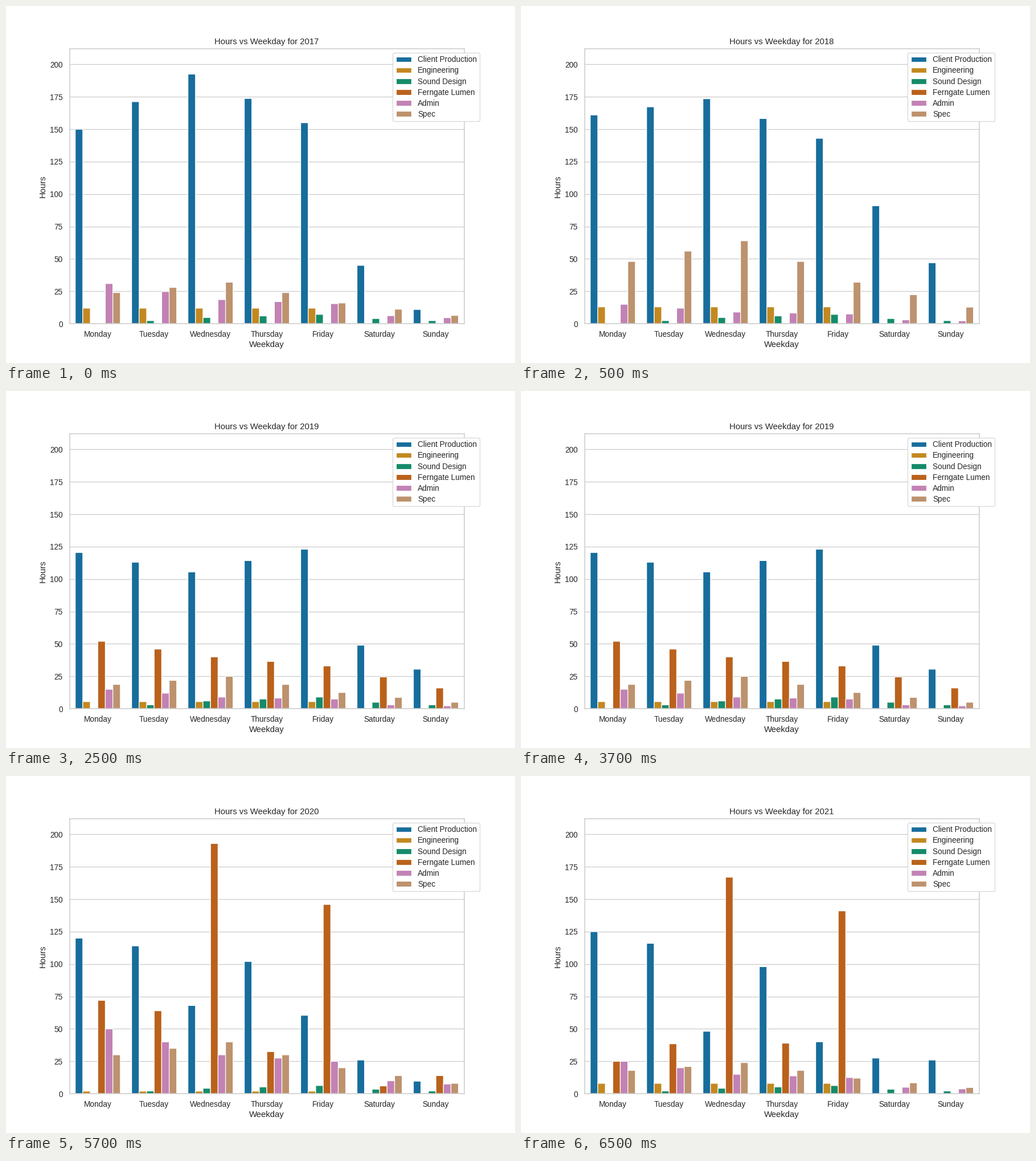
A matplotlib script that plays this animation: 894x626 px, repeating every 8000 ms.

```python
import colorsys

import matplotlib.pyplot as plt
import numpy as np
from matplotlib.animation import FuncAnimation
from matplotlib.colors import to_rgb

WIDTH, HEIGHT, DPI = 894, 626, 72   # at 72 dpi one point is one pixel
SCALE = 0.894 * 100 / DPI           # theme sizes assume a 10 x 7 inch page
INK, RULE = "0.15", "0.8"
DAYS = ["Monday", "Tuesday", "Wednesday", "Thursday", "Friday", "Saturday", "Sunday"]
FIRST_YEAR = 2017
FOCUS_DAYS = [2, 4]                 # Wednesday and Friday


def week(mon, wed, fri, sat, sun):
    """Hours for seven days; Tuesday and Thursday lie between their neighbours."""
    return np.interp(range(7), [0, 2, 4, 5, 6], [mon, wed, fri, sat, sun])


def scaled(profile, levels):
    """One weekly profile, with a different level each year."""
    return np.outer(levels, week(*profile))


client = np.array([
    week(150, 192.5, 155, 45, 11),
    week(161, 173.5, 143, 91, 47),
    week(120.5, 105.5, 123, 49, 30.5),
    week(120, 108, 96, 26, 9.7),
    week(125, 107, 89, 27.5, 26),
])
project = np.array([
    week(0, 0, 0, 0, 0),
    week(0, 0, 0, 0, 0),
    week(52, 40, 33, 24.5, 16),
    week(72, 56, 9, 6, 14),
    week(25, 52, 26, 0, 0),
])
# In the last two years the project takes over the focus days.
client[3:, FOCUS_DAYS] *= [[0.63], [0.45]]
project[3:, FOCUS_DAYS] += [[137], [115]]

SERIES = [
    ("Client Production", "#0173b2", client),
    ("Engineering", "#de8f05", scaled((1, 1, 1, 0, 0), (12, 13, 5.5, 2, 8))),
    ("Sound Design", "#029e73", scaled((0, 0.6, 0.9, 0.5, 0.3), (8, 8, 10, 7, 7))),
    ("Ferngate Lumen", "#d55e00", project),
    ("Admin", "#cc78bc", scaled((1, 0.6, 0.5, 0.2, 0.15), (31, 15, 15, 50, 25))),
    ("Spec", "#ca9161", scaled((0.75, 1, 0.5, 0.35, 0.2), (32, 64, 25, 40, 24))),
]


def muted(color):
    h, l, s = colorsys.rgb_to_hls(*to_rgb(color))
    return colorsys.hls_to_rgb(h, l, s * 0.75)


plt.rcParams.update({
    "font.family": "Liberation Sans",
    "text.color": INK,
    "axes.labelcolor": INK,
    "axes.edgecolor": RULE,
    "axes.linewidth": 1.25 * SCALE,
    "axes.axisbelow": True,
    "patch.linewidth": SCALE,
})

fig, ax = plt.subplots(figsize=(WIDTH / DPI, HEIGHT / DPI), dpi=DPI, facecolor="white")
fig.subplots_adjust(left=0.125, right=0.9, bottom=0.11, top=0.88)
ax.set_xlim(-0.5, len(DAYS) - 0.5)
ax.set_ylim(0, 212)
ax.set_xticks(range(len(DAYS)), DAYS)
ax.set_yticks(range(0, 201, 25))
ax.tick_params(length=0, pad=9.5 * SCALE, labelsize=11 * SCALE, labelcolor=INK)
ax.grid(axis="y", color=RULE, linewidth=SCALE)
ax.set_xlabel("Weekday", fontsize=12 * SCALE, labelpad=3.3 * SCALE)
ax.set_ylabel("Hours", fontsize=12 * SCALE, labelpad=4 * SCALE)
title = ax.set_title("", fontsize=12 * SCALE, pad=6.5 * SCALE)

bar_width = 0.8 / len(SERIES)
groups = [
    ax.bar(np.arange(len(DAYS)) - 0.4 + (i + 0.5) * bar_width, hours[0], bar_width,
           color=muted(color), edgecolor="white", snap=False, label=name)
    for i, (name, color, hours) in enumerate(SERIES)
]
ax.legend(loc="upper right", bbox_to_anchor=(1.05, 1), fontsize=11 * SCALE,
          labelspacing=0.37, framealpha=1, edgecolor="0.84")


def update(step):
    year = (step + 3) // 4   # the first year shows for a single step
    title.set_text(f"Hours vs Weekday for {FIRST_YEAR + year}")
    for bars, (_, _, hours) in zip(groups, SERIES):
        for bar, height in zip(bars, hours[year]):
            bar.set_height(height)
            bar.set_visible(height > 0)


anim = FuncAnimation(fig, update, frames=16, interval=500, init_func=lambda: update(0),
                     repeat=True, repeat_delay=0, blit=False)
plt.show()
```
